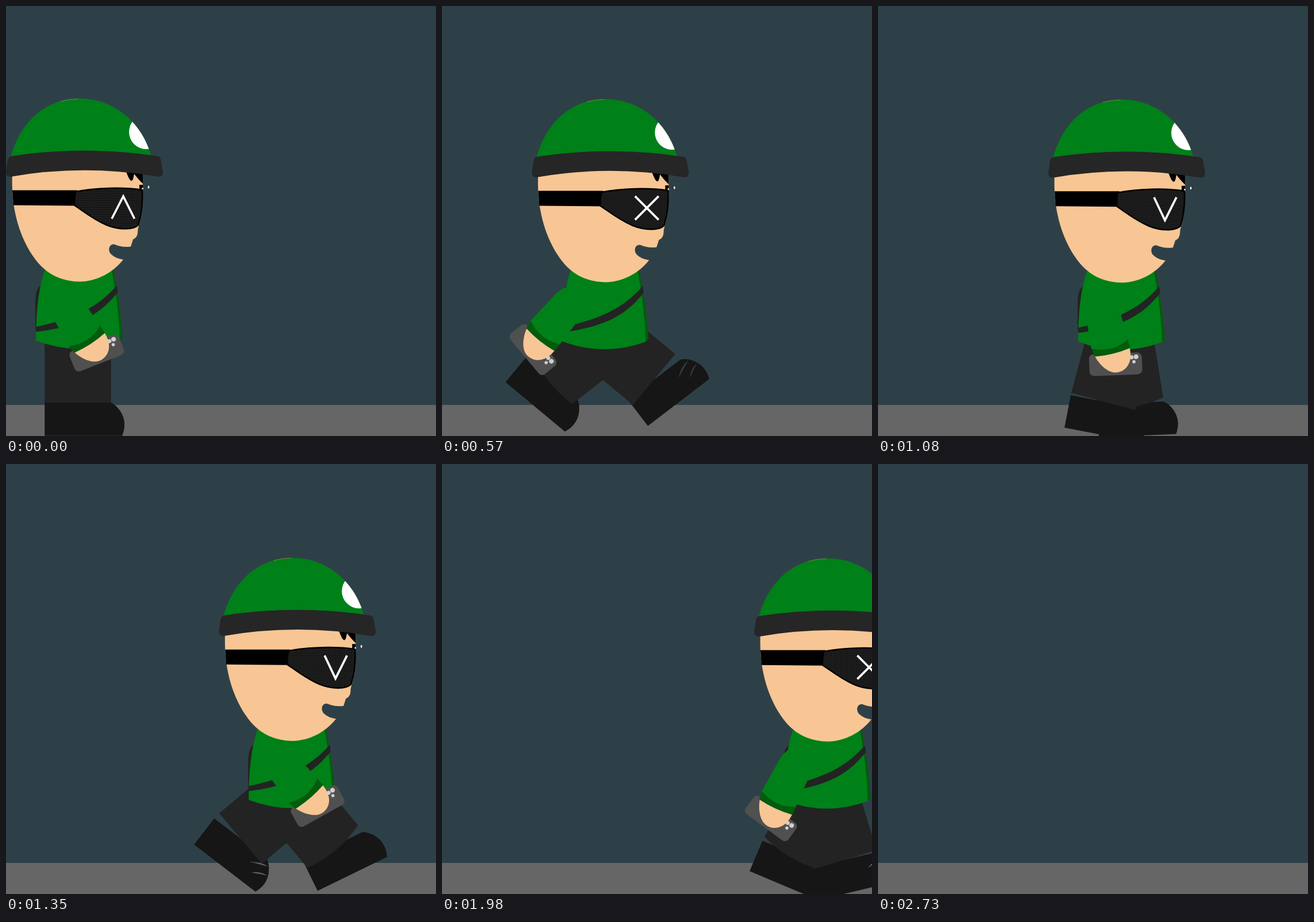
Write an HTML page that moves like this. It is 748 px wide and 748 px high and loops after 2.76 s.

```html
<!DOCTYPE html>
<html lang="en">
<head>
<meta charset="utf-8">
<title>Walking gamer</title>
<style>
  html, body { margin: 0; width: 100%; height: 100%; overflow: hidden; background: #2e4047; }
  svg { display: block; width: 100vw; height: 100vh; }
  .green { fill: #008018; }
  .dark-green { fill: #035b0d; }
  .skin { fill: #f7c694; }
  .cloth { fill: #232323; }
  .shoe { fill: #161616; fill-rule: evenodd; }
  .sign { fill: none; stroke: #fff; stroke-width: 3.7; }
</style>
</head>
<body>
<svg viewBox="0 0 748 748">
  <defs>
    <pattern id="mesh" width="4" height="4" patternUnits="userSpaceOnUse">
      <rect width="4" height="4" fill="#161616"/>
      <path d="M0 .5H4M.5 0V4" stroke="#202020" stroke-width="1"/>
    </pattern>
    <clipPath id="capShape">
      <path d="M8 263C25 200 70 161 128 161C190 161 238 205 253 263Z"/>
    </clipPath>
  </defs>

  <rect width="748" height="748" fill="#2e4047"/>
  <rect y="694" width="748" height="54" fill="#666"/>

  <g id="walker">
    <!-- Leg parts are drawn around the hip, feet around the ankle -->
    <g id="legA">
      <g id="footA">
        <path class="shoe" d="M-57.5 0H57.5C70 6 81 22 81 38C81 46 79 52 77 57.5H-57.5Z"/>
      </g>
      <path class="cloth" d="M-57.5 -4H57.5V114Q0 130 -57.5 114Z"/>
    </g>
    <g id="legB">
      <g id="footB">
        <path class="shoe" d="M-57.5 0H57.5C70 6 81 22 81 38C81 46 79 52 77 57.5H-57.5Z
          M36 23.5Q50 10 68 9.7Q53 15 36 23.5ZM51 35.6Q61 24 76.5 22.7Q64 28 51 35.6Z"/>
      </g>
      <path class="cloth" d="M-57.5 -4H57.5V114H-57.5Z"/>
    </g>

    <path class="cloth" d="M60 486Q51 492 51 515V562H75V486Z"/>
    <path class="dark-green" d="M150 455H186Q199 520 203 578L198 583H150Z"/>
    <path class="green" d="M69 455C56 490 52 535 52 582Q125 610 198 583Q196 520 183 455Z"/>
    <path class="cloth" d="M193 486C165 518 130 542 52 558V567C140 556 170 528 194.5 498Z"/>

    <g id="arm">
      <g transform="translate(85.6 625.5) rotate(11.5)">
        <rect x="-46" y="-19" width="92" height="38" rx="8" fill="#505050"/>
        <g fill="#d0d0d0">
          <circle cx="36" cy="-11.5" r="4"/>
          <circle cx="28" cy="-11" r="3.5"/>
          <circle cx="32" cy="-3" r="2.8"/>
        </g>
      </g>
      <path class="skin" d="M53 600C56 615 68 640 87 640C104 640 117 626 116 600Z"/>
      <path class="dark-green" d="M51 586L53 604Q85 609 116.500 604V586Z"/>
      <path class="green" d="M51 589L56 523Q59 505 70 495Q85 482 103 495Q114 505 115 530L116 589Q85 605 51 589Z"/>
    </g>

    <path class="skin" d="M12 270Q10 300 11 320C13 365 27 412 56 447C77 471 102 479 128 479.5
      C158 479 186 464 204 441C196 440 188 437 182 431C177 425 179 414 188 414.5C196 418 206 420 217 418.5
      L221 406Q228 403 229 395Q229 388 231 382C236 365 238 345 238 325V270Z"/>
    <path d="M209 288C212 296 215 304 218.5 304C221 304 222 297 223 292C228 299 234 305 238 309V286Z"/>
    <path d="M232 311H238V320H232Z"/>
    <g fill="#fff">
      <ellipse cx="237.5" cy="318" rx="1.3" ry="2"/>
      <ellipse cx="248" cy="315" rx="1.3" ry="2.5"/>
    </g>

    <path d="M11 320.5H124V347.5L13 346.5Z"/>
    <path d="M121 323C155 316 205 315 237 320C238 340 236 362 230 381C222 389.5 197 390 175 381
      C152 371 136 358 119 346.5Q119 333 121 323Z" fill="url(#mesh)" stroke="#000" stroke-width="2.5"/>
    <path id="sign" class="sign"/>

    <path class="green" d="M8 263C25 200 70 161 128 161C190 161 238 205 253 263Z"/>
    <path d="M95 166Q110 161.5 126 161.5" fill="none" stroke="#8f8a4a" stroke-width=".8"/>
    <circle cx="244" cy="219" r="30" fill="#fff" clip-path="url(#capShape)"/>
    <path d="M10 261Q136 242 262 261Q268 262 269 266L273 288Q273 297 266 297L262 296.5
      Q135 275 8 297Q0 297 0 289L3 268Q4 262 10 261Z" fill="#262626"/>
  </g>
</svg>
<script>
const LOOP = 2760, STEP = 30;
const HIP = [125, 576], SHIN = 114, SHOULDER = [84.7, 492.5];
const SIGN_TIME = LOOP / 8;
const SIGNS = [
  'M184 370L204 331L223.5 370',
  'M179.500 330L220.500 371M220.500 330L179.500 371',
  'M175.5 350a23.5 23.5 0 1 0 47 0a23.5 23.5 0 1 0 -47 0',
  'M184 331L203 371L223 331'
];

// time, leg A, foot A, leg B, foot B, arm (degrees)
const POSES = [
  [0, 0, 0, 0, 0, -33],
  [330, 34, 26.5, -34, -26.5, 12.5],
  [540, 56, 42, -54, -40, 42],
  [780, 25, 24, -24, -18.6, 16],
  [1350, -40, -26, 50, 37.5, -40.6],
  [1410, -46, -30, 57, 42, -47],
  [1740, 0, 0, 13, 8, -4.5],
  [2160, 53, 40, -39, -29, 47],
  [2250, 42, 32, -28, -21, 38],
  [LOOP, -22, -16, 22, 16, -25]
];

const parts = {};
for (const id of ['walker', 'legA', 'footA', 'legB', 'footB', 'arm', 'sign']) {
  parts[id] = document.getElementById(id);
}
const place = (id, transform) => parts[id].setAttribute('transform', transform);

function poseAt(time) {
  const next = POSES.findIndex(pose => pose[0] > time);
  const from = POSES[next - 1], to = POSES[next];
  const part = (time - from[0]) / (to[0] - from[0]);
  return from.map((value, i) => value + (to[i] - value) * part);
}

function placeLeg(side, leg, foot) {
  place('leg' + side, `translate(${HIP}) rotate(${leg})`);
  place('foot' + side, `translate(0 ${SHIN}) rotate(${foot - leg})`);
}

function draw(time) {
  const [, legA, footA, legB, footB, arm] = poseAt(time);
  place('walker', `translate(${time * 0.2742} ${time * 0.0016})`);
  placeLeg('A', legA, footA);
  placeLeg('B', legB, footB);
  place('arm', `rotate(${arm} ${SHOULDER})`);
  parts.sign.setAttribute('d', SIGNS[Math.floor((time + 20) / SIGN_TIME) % SIGNS.length]);
}

const start = performance.now();
function tick() {
  const time = (performance.now() - start) % LOOP;
  draw(Math.floor(time / STEP) * STEP);
  requestAnimationFrame(tick);
}
tick();
</script>
</body>
</html>
```
